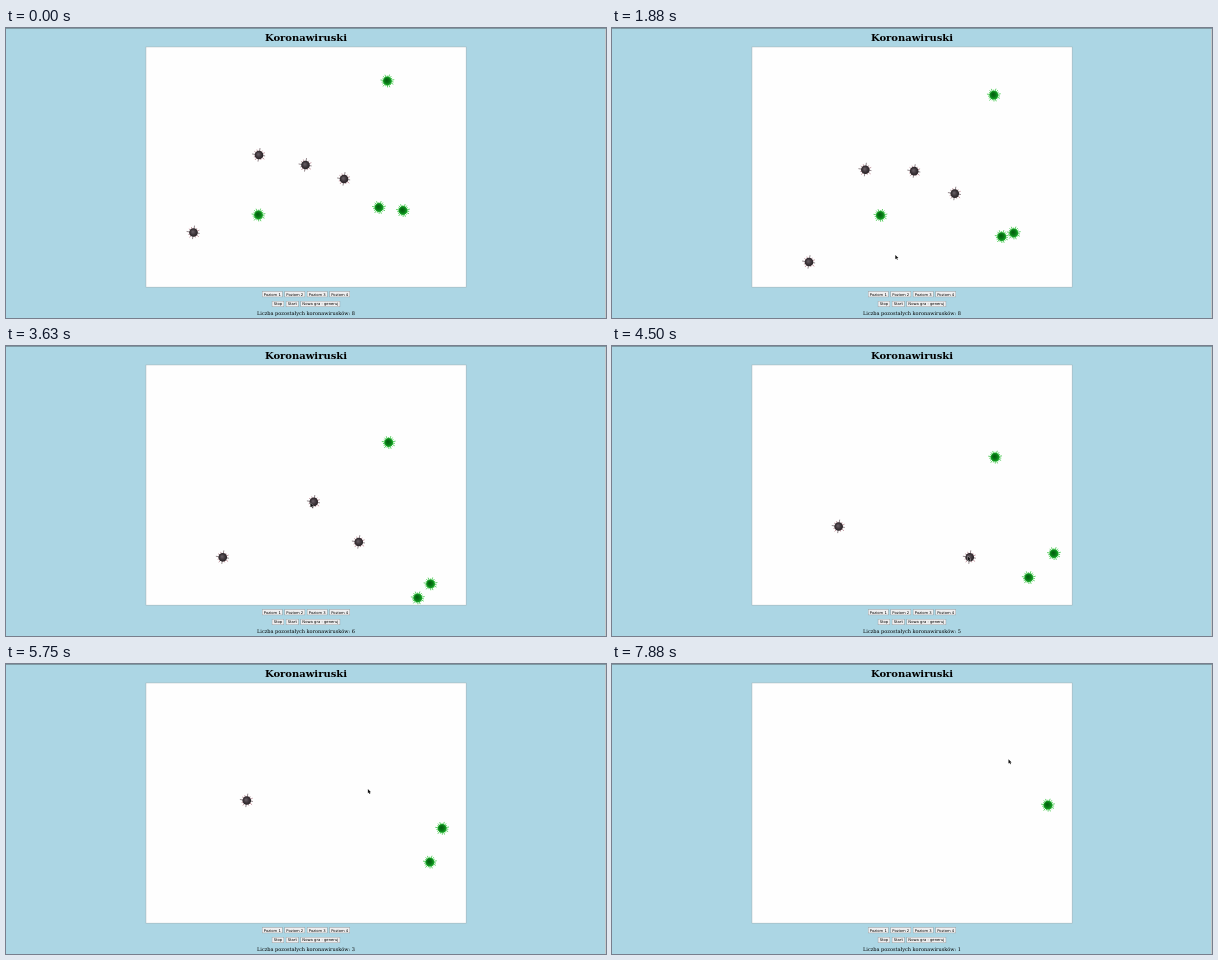
An HTML page with a canvas for the animation above (8 s loop, 600x290 px).

```html
<!DOCTYPE html>
<html lang="pl">
<head>
<meta charset="utf-8">
<title>Koronawiruski</title>
<style>
html, body { margin: 0; width: 100%; height: 100%; overflow: hidden; background: #acd6e4; }
canvas { display: block; width: 600px; height: 290px; }
</style>
</head>
<body>
<canvas id="stage" width="600" height="290"></canvas>
<script>
const ctx = document.getElementById('stage').getContext('2d');
const LOOP = 8000, STEP = 125, START = 1040, TAU = Math.PI * 2;
const WALL = { right: 451.5, bottom: 253.5 };
const SERIF = '"DejaVu Serif", serif', SANS = '"DejaVu Sans", sans-serif';

// Start place, speed in px per second and moment of the click, in click order.
const viruses = [
  { x: 252.5, y: 187, vx: 19, vy: 0.5, end: 2380, green: true },
  { x: 253, y: 127, vx: 0.4, vy: 17.5, end: 3000 },
  { x: 299.5, y: 137, vx: 3.2, vy: 7.3, end: 3750 },
  { x: 338, y: 151, vx: 5.7, vy: 17.4, end: 4630 },
  { x: 381.4, y: 53, vx: 0.5, vy: 16.8, end: 5500, green: true },
  { x: 187.5, y: 204.5, vx: 11.3, vy: 35.2, end: 6500 },
  { x: 373, y: 179.5, vx: 19.9, vy: 34.6, end: 7750, green: true },
  { x: 397, y: 182.5, vx: 5.7, vy: 26.8, end: LOOP, green: true }
];

const bounce = (p, wall) => wall - Math.abs(wall - p);

function place(v, t) {
  const s = Math.max(0, t - START) / 1000;
  return [bounce(v.x + v.vx * s, WALL.right), bounce(v.y + v.vy * s, WALL.bottom)];
}

// The pointer comes in, presses Start and then visits each clicked virus.
const stops = [
  { t: 130, at: [600, 2] }, { t: 880, at: [290, 276] }, { t: 1300, at: [290, 276] },
  ...viruses.filter(v => v.end < LOOP).map(v => ({ t: v.end, at: place(v, v.end) }))
];

function pointerAt(t) {
  if (t < stops[0].t) return null;
  const i = stops.findIndex(s => s.t > t);
  if (i < 0) return stops[stops.length - 1].at;
  const a = stops[i - 1], b = stops[i];
  const u = (t - a.t) / (b.t - a.t), e = u * u * (3 - 2 * u);
  return a.at.map((p, k) => p + (b.at[k] - p) * e);
}

function text(str, x, y, font) {
  ctx.font = font;
  ctx.fillStyle = '#000';
  ctx.textAlign = 'center';
  ctx.fillText(str, x, y);
}

function rect(x, y, w, h, color) {
  ctx.fillStyle = color;
  ctx.fillRect(x, y, w, h);
}

function disc(r, color) {
  ctx.fillStyle = color;
  ctx.beginPath();
  ctx.arc(0, 0, r, 0, TAU);
  ctx.fill();
}

function virus(x, y, green) {
  ctx.save();
  ctx.translate(x, y);
  const count = green ? 18 : 12;
  ctx.lineWidth = green ? 0.7 : 0.6;
  for (let i = 0; i < count; i++) {
    const a = i / count * TAU + 0.15, r = 6.2 + 0.8 * Math.sin(i * 2.3);
    ctx.strokeStyle = green ? '#20bd2c' : i % 3 ? '#a35f6c' : '#4d3a40';
    ctx.beginPath();
    ctx.moveTo(0, 0);
    ctx.lineTo(Math.cos(a) * r, Math.sin(a) * r);
    ctx.stroke();
  }
  const body = ctx.createRadialGradient(-0.8, -0.8, 0.5, 0, 0, 4.6);
  const shades = green ? ['#04600f', '#087a16', '#1cae2a'] : ['#62595f', '#3f373c', '#241e21'];
  shades.forEach((c, i) => body.addColorStop(i / 2, c));
  disc(green ? 4.4 : 4.3, body);
  ctx.restore();
}

function drawPointer(x, y) {
  ctx.save();
  ctx.translate(x, y);
  ctx.scale(0.85, 0.85);
  ctx.beginPath();
  [[0, 0], [0, 5], [1.2, 4], [2, 5.8], [2.9, 5.4], [2.1, 3.7], [3.7, 3.6]].forEach(p => ctx.lineTo(...p));
  ctx.closePath();
  ctx.lineWidth = 0.6;
  ctx.strokeStyle = '#fff';
  ctx.stroke();
  ctx.fillStyle = '#111';
  ctx.fill();
  ctx.restore();
}

// A centred row of buttons, each as wide as its label plus padding.
function buttonRow(labels, y, mouse) {
  const h = 5.9, gap = 1.9, font = '3.75px ' + SANS;
  ctx.font = font;
  const widths = labels.map(s => ctx.measureText(s).width + 3.6);
  let x = 300 - (widths.reduce((a, b) => a + b) + gap * (labels.length - 1)) / 2;
  labels.forEach((label, i) => {
    const w = widths[i];
    const over = mouse && mouse[0] > x && mouse[0] < x + w && mouse[1] > y && mouse[1] < y + h;
    rect(x, y, w, h, '#858b8e');
    rect(x + 0.35, y + 0.35, w - 0.7, h - 0.7, over ? '#cfcfd2' : '#efeff0');
    text(label, x + w / 2, y + 4.3, font);
    x += w + gap;
  });
}

function draw(t) {
  rect(0, 0, 600, 290, '#acd6e4');
  rect(0, 0, 600, 1, '#7e9aa4');
  rect(599, 1, 1, 289, '#c3cacc');
  text('Koronawiruski', 300, 13, 'bold 10px ' + SERIF);
  rect(139.7, 18.7, 320.7, 240.7, '#a4afb3');
  rect(140.2, 19.2, 319.7, 239.7, '#fefefe');

  const alive = viruses.filter(v => t < v.end);
  for (const v of [...alive].reverse()) virus(...place(v, t), v.green);

  const mouse = pointerAt(t);
  buttonRow([1, 2, 3, 4].map(n => 'Poziom ' + n), 263.2, mouse);
  buttonRow(['Stop', 'Start', 'Nowa gra - generuj'], 273, mouse);
  text('Liczba pozostałych koronawirusków: ' + alive.length, 300, 287, '5px ' + SERIF);
  if (mouse) drawPointer(...mouse);
}

function tick() {
  const t = Math.floor(performance.now() % LOOP / 10) * 10;
  draw(Math.floor(t / STEP) * STEP + 5);
  requestAnimationFrame(tick);
}
tick();
</script>
</body>
</html>
```
